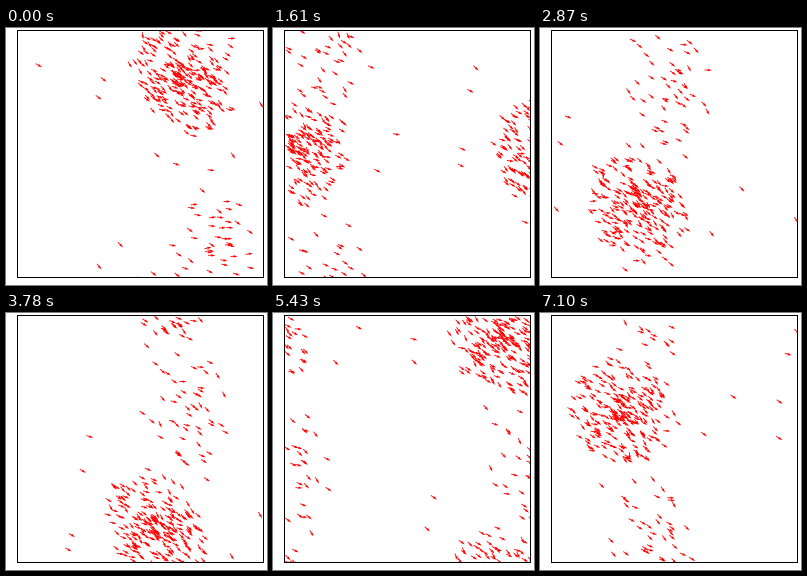
These frames come from a looping animation (261 px wide and 257 px high, 7.17 s). A matplotlib script:

```python
import numpy as np
import matplotlib.pyplot as plt
from matplotlib.animation import FuncAnimation

WIDTH, HEIGHT, DPI = 261, 257, 100
LEFT, TOP, BOX_W, BOX_H = 11.1, 2.1, 246, 247
LOOP, TICK, STEP = 7170, 30, 70

rng = np.random.default_rng(11)

# The simulation advances every STEP ms, except for two short stalls.
times = np.arange(STEP, LOOP - STEP, STEP)
stalled = ((times > 4650) & (times < 4880)) | ((times > 4990) & (times < 5090))
times = times[~stalled]
steps = np.arange(len(times) + 1)[:, None]

# The flock crosses the torus at constant velocity while it shears;
# the tail falls behind and then keeps its distance.
flock_x = 174 + 4.1 * steps
flock_y = 50 + 3.03 * steps
shear = 0.2 + 0.18 * np.cos(2 * np.pi * steps / 58)
lag = 115 - 36 * np.exp(-steps / 20)


def blob(n, x, y, sx, sy, slant=0, reach=2.0, core=0.7):
    """Paths of n birds in a moving, sheared ellipse, densest at its core."""
    r = reach * rng.random(n) ** core
    a = rng.uniform(0, 2 * np.pi, n)
    u, v = r * np.cos(a), r * np.sin(a)
    px = x + sx * u
    py = y + sy * (slant * u + np.sqrt(1 - slant ** 2) * v)
    return np.stack([px, py], axis=-1)


def wander(n):
    """Mean-reverting random walk from the heading noise."""
    w = np.zeros((len(steps), n, 2))
    w[0] = rng.normal(0, 3, (n, 2))
    for i in range(1, len(w)):
        w[i] = 0.97 * w[i - 1] + rng.normal(0, 1.1, (n, 2))
    return w


paths = np.concatenate([
    blob(236, flock_x, flock_y, 25, 27, shear),
    blob(52, flock_x + 29, flock_y - lag, 18, 36),
    blob(12, flock_x + 5, flock_y - 20, 50, 60, core=0.4)], axis=1)
paths += wander(paths.shape[1])

moves = np.diff(paths, axis=0)
moves = np.concatenate([moves, moves[-1:]])
heading = np.arctan2(-moves[..., 1], moves[..., 0])
spots = (paths - (LEFT, TOP)) % (BOX_W, BOX_H)

fig = plt.figure(figsize=(WIDTH / DPI, HEIGHT / DPI), dpi=DPI, facecolor="white")
ax = fig.add_axes([LEFT / WIDTH, 1 - (TOP + BOX_H) / HEIGHT,
                   BOX_W / WIDTH, BOX_H / HEIGHT])
ax.set(xlim=(0, BOX_W), ylim=(BOX_H, 0), xticks=[], yticks=[])
for spine in ax.spines.values():
    spine.set_linewidth(72 / DPI)

birds = ax.quiver(spots[0, :, 0], spots[0, :, 1],
                  np.cos(heading[0]), np.sin(heading[0]),
                  color="red", units="width", width=0.0035, scale=34)


def draw(k):
    i = np.searchsorted(times, k * TICK + 20, side="right")
    birds.set_offsets(spots[i])
    birds.set_UVC(np.cos(heading[i]), np.sin(heading[i]))
    return birds,


anim = FuncAnimation(fig, draw, frames=LOOP // TICK, interval=TICK,
                     repeat=True, repeat_delay=0, blit=False)
plt.show()
```
